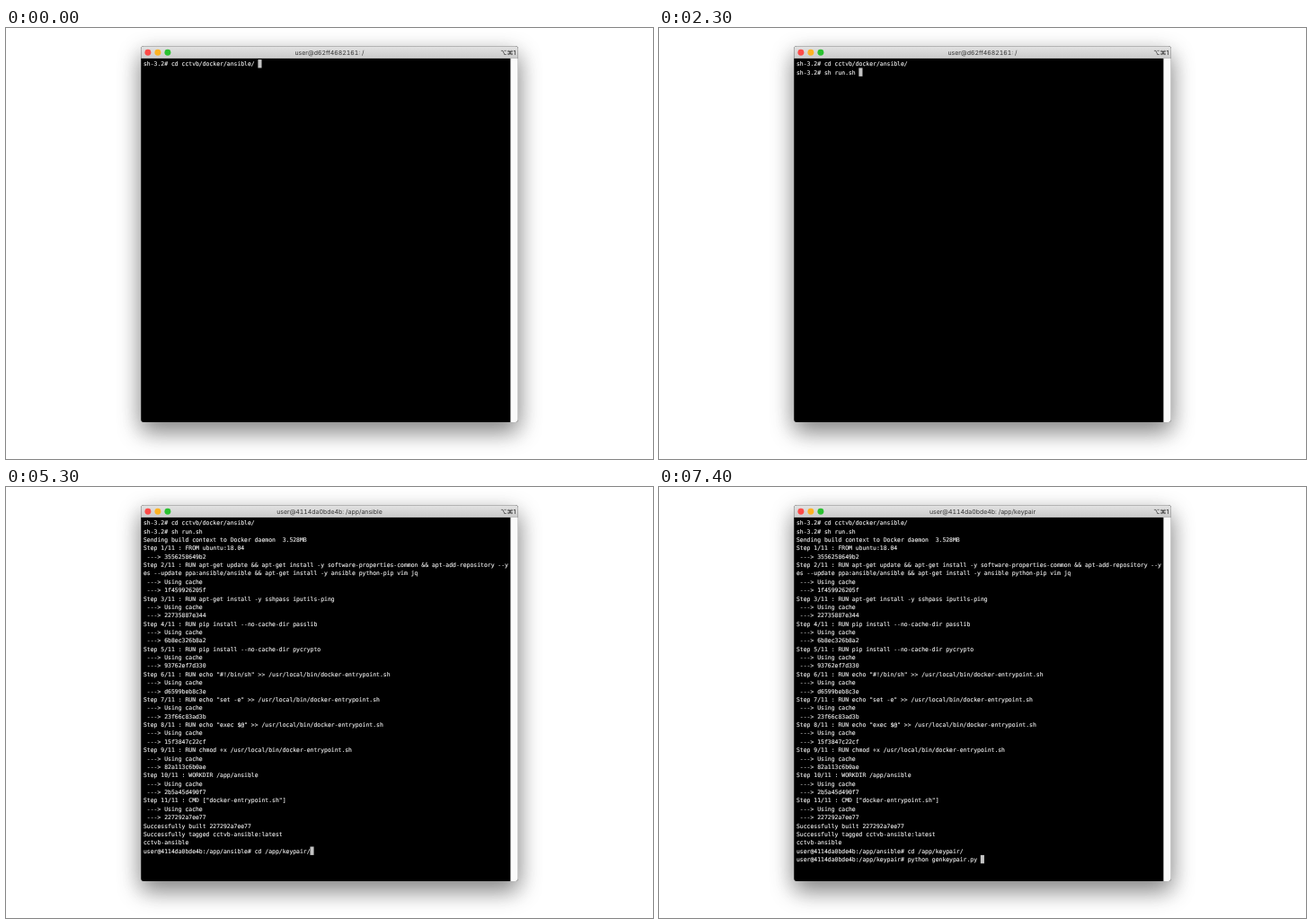
Write an HTML page that moves like this. It is 720 by 480 pixels and loops after 8 s.

```html
<!DOCTYPE html>
<html lang="en">
<head>
<meta charset="utf-8">
<title>Terminal</title>
<style>
  html, body { margin: 0; width: 100%; height: 100%; overflow: hidden; background: #fff; }
  svg { display: block; width: 720px; height: 480px; }
  text { white-space: pre; text-rendering: geometricPrecision; }
  .window { filter: drop-shadow(0 10px 13px rgba(0, 0, 0, .42)) drop-shadow(0 0 .5px rgba(0, 0, 0, .35)); }
  .row { font: 6.43px "DejaVu Sans Mono", monospace; fill: #f0f0f0; stroke: #f0f0f0; stroke-width: .12px; }
  .title { font: 6.95px Inter, sans-serif; font-variant-numeric: tabular-nums; fill: #333; text-anchor: middle; }
  .keys { font: 7px Inter, "DejaVu Sans", sans-serif; fill: #222; text-anchor: end; }
  .cursor { fill: #c4c4c4; }

  .cd, .run, .build, .python, .typed, .log { animation: 8s step-end infinite; }
  .cd { animation-name: cd; }
  .run { animation-name: run; }
  .build { animation-name: build; }
  .python { animation-name: python; }
  .typed { animation-name: typed; }
  .log { animation-name: log; }
  @keyframes cd { 0% { opacity: 1 } 6.25%, 100% { opacity: 0 } }
  @keyframes run { 0% { opacity: 0 } 6.25% { opacity: 1 } 43.75%, 100% { opacity: 0 } }
  @keyframes build { 0% { opacity: 0 } 43.75% { opacity: 1 } 81.25%, 100% { opacity: 0 } }
  @keyframes python { 0% { opacity: 0 } 81.25%, 100% { opacity: 1 } }
  @keyframes typed { 0% { opacity: 0 } 6.25%, 100% { opacity: 1 } }
  @keyframes log { 0% { opacity: 0 } 43.75%, 100% { opacity: 1 } }
</style>
</head>
<body>
<svg viewBox="0 0 720 480">
  <defs>
    <linearGradient id="metal" x2="0" y2="1">
      <stop stop-color="#e3e3e3"/>
      <stop offset="1" stop-color="#cbcbcb"/>
    </linearGradient>
    <clipPath id="frame"><rect x="150.3" y="20.3" width="419.5" height="418.6" rx="3"/></clipPath>
  </defs>
  <g class="window">
    <g clip-path="url(#frame)">
      <rect x="150" y="20" width="420" height="419"/>
      <rect x="150" y="20" width="420" height="13.9" fill="url(#metal)"/>
      <rect x="561.4" y="33.9" width="8.6" height="406" fill="#fafafa"/>
    </g>
  </g>
  <circle cx="157.9" cy="27.2" r="3.45" fill="#fc4b48"/>
  <circle cx="168.9" cy="27.2" r="3.45" fill="#fdb324"/>
  <circle cx="179.9" cy="27.2" r="3.45" fill="#2ac131"/>
  <text class="keys" x="567.3" y="29.8">⌥⌘1</text>
  <g id="always"></g>
  <g id="typed" class="typed"></g>
  <g id="log" class="log"></g>
  <g id="cd" class="cd"></g>
  <g id="run" class="run"></g>
  <g id="build" class="build"></g>
  <g id="python" class="python"></g>
</svg>
<script>
  const LEFT = 153, TOP = 35.1, CHAR = 3.87, LINE = 9.37;

  function add(group, tag, attrs, text = '') {
    const el = document.createElementNS('http://www.w3.org/2000/svg', tag);
    for (const key in attrs) el.setAttribute(key, attrs[key]);
    el.textContent = text;
    document.getElementById(group).append(el);
  }

  function write(group, row, text) {
    add(group, 'text', { class: 'row', x: LEFT, y: TOP + row * LINE + 7.1 }, text);
  }

  function cursor(group, row, col) {
    add(group, 'rect', {
      class: 'cursor', x: LEFT + col * CHAR - .3, y: TOP + row * LINE, width: 4.1, height: LINE
    });
  }

  function title(group, text) {
    add(group, 'text', { class: 'title', x: 360, y: 29.8 }, text);
  }

  const steps = [
    ['FROM ubuntu:18.04', '3556258649b2'],
    ['RUN apt-get update && apt-get install -y software-properties-common && apt-add-repository --y\n' +
     'es --update ppa:ansible/ansible && apt-get install -y ansible python-pip vim jq', '1f459926205f'],
    ['RUN apt-get install -y sshpass iputils-ping', '22735887e344'],
    ['RUN pip install --no-cache-dir passlib', '6b8ec326b8a2'],
    ['RUN pip install --no-cache-dir pycrypto', '93762ef7d330'],
    ['RUN echo "#!/bin/sh" >> /usr/local/bin/docker-entrypoint.sh', 'd6599beb8c3e'],
    ['RUN echo "set -e" >> /usr/local/bin/docker-entrypoint.sh', '23f66c83ad3b'],
    ['RUN echo "exec $@" >> /usr/local/bin/docker-entrypoint.sh', '15f3847c22cf'],
    ['RUN chmod +x /usr/local/bin/docker-entrypoint.sh', '82a113c6b0ae'],
    ['WORKDIR /app/ansible', '2b5a45d490f7'],
    ['CMD ["docker-entrypoint.sh"]', '227292a7ee77']
  ];

  const host = 'user@4114da0bde4b:';
  const shell = 'sh-3.2# ';
  const cdLine = shell + 'cd cctvb/docker/ansible/ ';
  const runLine = shell + 'sh run.sh ';
  const keyLine = host + '/app/ansible# cd /app/keypair/';
  const pyLine = host + '/app/keypair# python genkeypair.py ';

  const output = ['Sending build context to Docker daemon  3.528MB'];
  steps.forEach(([command, hash], i) => {
    output.push(...`Step ${i + 1}/11 : ${command}`.split('\n'));
    if (i) output.push(' ---> Using cache');
    output.push(' ---> ' + hash);
  });
  output.push('Successfully built 227292a7ee77',
    'Successfully tagged cctvb-ansible:latest', 'cctvb-ansible', keyLine);

  const last = output.length + 1;
  write('always', 0, cdLine);
  write('typed', 1, runLine);
  output.forEach((line, i) => write('log', i + 2, line));
  write('python', last + 1, pyLine);

  cursor('cd', 0, cdLine.length);
  cursor('run', 1, runLine.length);
  cursor('build', last, keyLine.length);
  cursor('python', last + 1, pyLine.length);

  for (const group of ['cd', 'run']) title(group, 'user@d62ff4682161: /');
  title('build', host + ' /app/ansible');
  title('python', host + ' /app/keypair');
</script>
</body>
</html>
```
